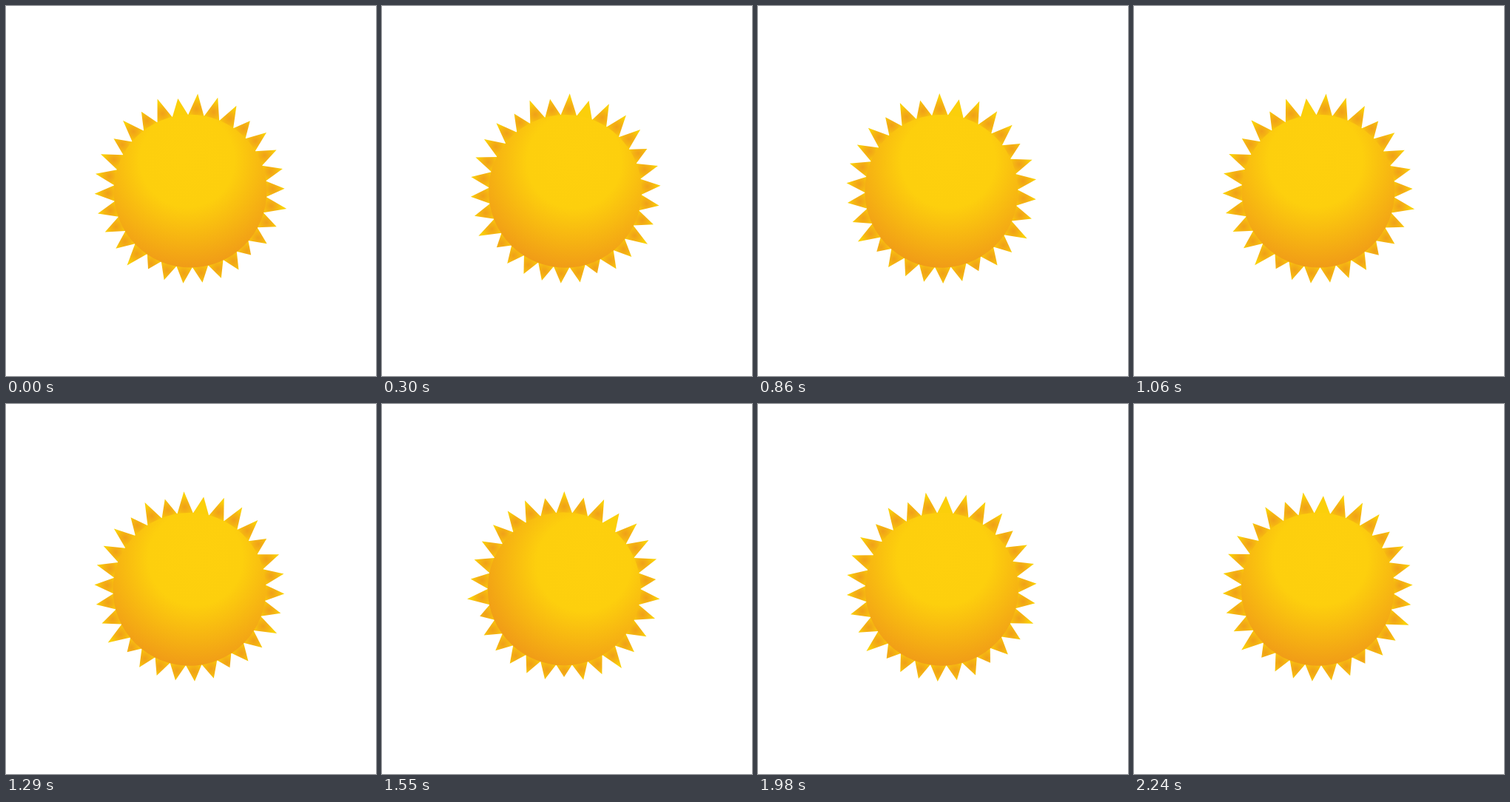
An HTML page with a canvas for the animation above (2.28 s loop, 500x500 px).

```html
<!DOCTYPE html>
<html lang="en">
<head>
<meta charset="utf-8">
<title>Swaying sun</title>
<style>
html, body { margin: 0; width: 100%; height: 100%; overflow: hidden; background: #fff; }
canvas { display: block; width: 500px; height: 500px; }
</style>
</head>
<body>
<canvas id="stage" width="500" height="500"></canvas>
<script>
const ctx = document.getElementById('stage').getContext('2d');
const TAU = Math.PI * 2;
const LOOP = 2280;
const STEPS = 54;     // still pictures per loop
const CYCLE = 24;     // steps for one sway there and back
const SWING = 45.4;   // widest turn, in degrees
const PIVOT = { x: 248, y: 246.5 };
const DISC = { x: 249, y: 250.2, r: 103.4 };

const RAYS = 30;
const FIRST = -85.6;  // direction of ray 0, in degrees
const LONG = [8, 18];
const SHORT = [3, 11, 17, 25, 27, 29];
const PLAIN = 29;     // the one ray without shading

const rad = deg => deg * Math.PI / 180;
const polar = (c, r, a) => [c.x + r * Math.cos(a), c.y + r * Math.sin(a)];

// straight line bent towards slow ends by k
const ease = (p, k) => p - k * Math.sin(TAU * p) / TAU;

// a soft rise, then a steadier fall
function swayAt(ms) {
  const step = Math.floor(ms / LOOP * STEPS);
  const p = Math.max(0, step - 1.07) / (CYCLE / 2) % 2;
  return rad(SWING * (p < 1 ? ease(p, 0.6) : 1 - ease(p - 1, 0.2)));
}

function radial(x, y, r, stops) {
  const g = ctx.createRadialGradient(x, y, 0, x, y, r);
  stops.forEach(([at, color]) => g.addColorStop(at, color));
  return g;
}

// rays point away from the disc, but their tips ring the pivot
function makeRay(_, i) {
  const a = rad(FIRST + i * 360 / RAYS), half = Math.PI / RAYS;
  const ring = LONG.includes(i) ? 134 : SHORT.includes(i) ? 122.5 : 128.5;
  const reach = ring + (PIVOT.x - DISC.x) * Math.cos(a) + (PIVOT.y - DISC.y) * Math.sin(a);
  const [x, y] = polar(DISC, DISC.r + 8, a);
  return {
    points: [
      polar(DISC, DISC.r - 0.5, a - half),
      polar(DISC, reach, a),
      polar(DISC, DISC.r - 0.5, a + half),
      [DISC.x, DISC.y]
    ],
    fill: i === PLAIN ? '#fbcf0b' : radial(x, y, 15, [
      [0, '#f0a018'], [0.5, '#f5b412'], [1, '#fad008']
    ])
  };
}

const rays = Array.from({ length: RAYS }, makeRay);
const discFill = radial(245, 208, 148, [
  [0, '#fed00d'], [0.43, '#fdcf0d'], [1, '#f09a17']
]);

function draw(ms) {
  ctx.fillStyle = '#fff';
  ctx.fillRect(0, 0, 500, 500);
  ctx.save();
  ctx.translate(PIVOT.x, PIVOT.y);
  ctx.rotate(swayAt(ms));
  ctx.translate(-PIVOT.x, -PIVOT.y);

  for (const { points, fill } of rays) {
    ctx.fillStyle = fill;
    ctx.beginPath();
    points.forEach(p => ctx.lineTo(...p));
    ctx.fill();
  }

  ctx.fillStyle = discFill;
  ctx.beginPath();
  ctx.arc(DISC.x, DISC.y, DISC.r, 0, TAU);
  ctx.fill();
  ctx.restore();
}

const start = performance.now();
function tick() {
  draw((performance.now() - start) % LOOP);
  requestAnimationFrame(tick);
}
tick();
</script>
</body>
</html>
```
